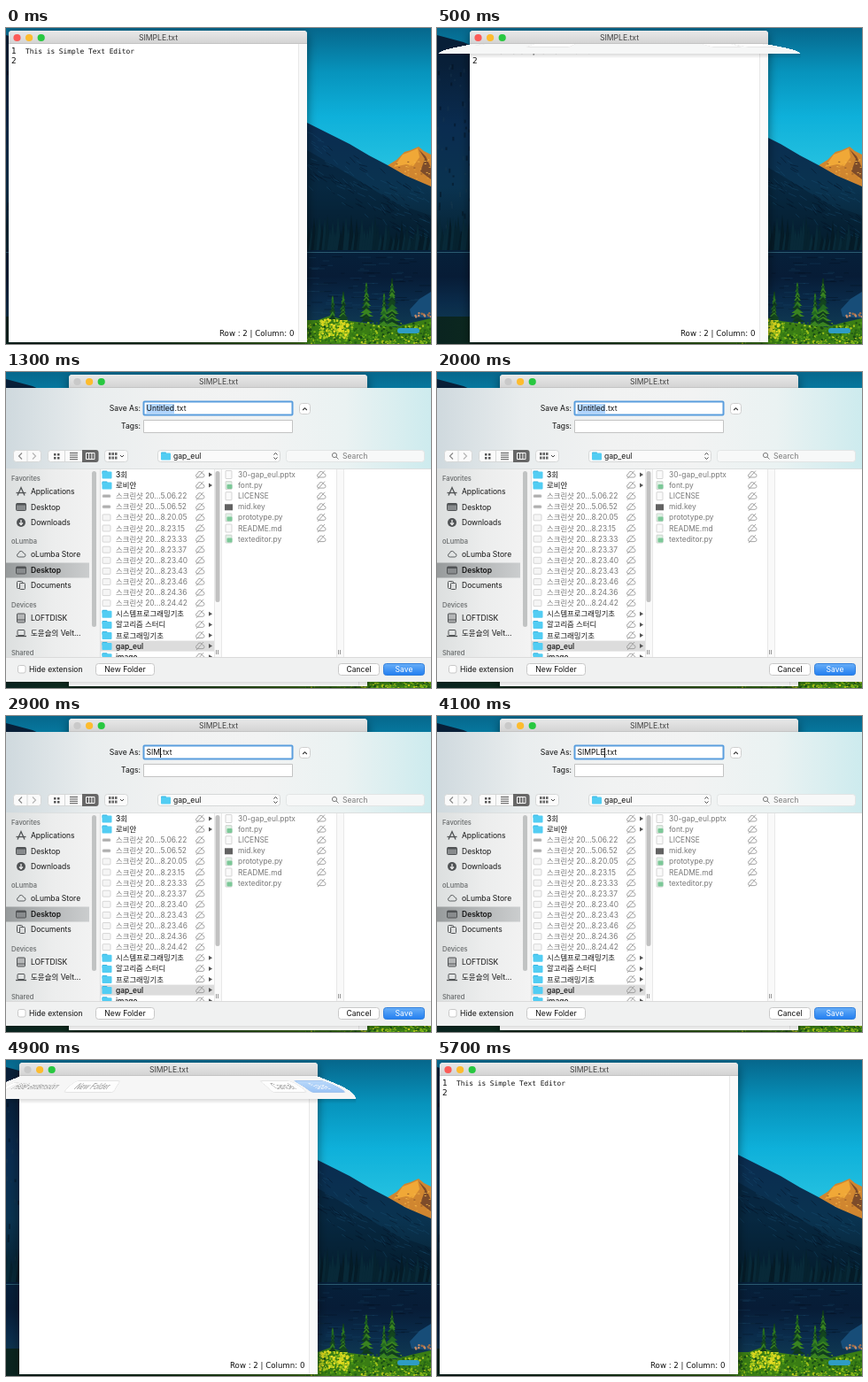
Animation of 480x357 px, one loop 5.8 s. Source, as an HTML page with a canvas:

```html
<!DOCTYPE html>
<html lang="en">
<head>
<meta charset="utf-8">
<title>Save sheet</title>
<style>
html, body { margin: 0; width: 100%; height: 100%; overflow: hidden; background: #06121f; }
canvas { display: block; }
</style>
</head>
<body>
<canvas id="stage" width="480" height="357"></canvas>
<script>
const W = 480, H = 357, TOP = 18, SHEET_H = 332, LOOP = 5800;
const UI = 'Inter, "Noto Sans CJK KR", "Noto Sans CJK", sans-serif';
const stage = document.getElementById('stage').getContext('2d');
const layer = () => Object.assign(document.createElement('canvas'), { width: W, height: H }).getContext('2d');
const wall = layer(), sheet = layer();
let g = stage;

const clamp = v => Math.max(0, Math.min(1, v));

function rect(x, y, w, h, fill) { g.fillStyle = fill; g.fillRect(x, y, w, h); }

function box(x, y, w, h, r, fill, stroke, line = 1) {
  g.beginPath();
  g.roundRect(x, y, w, h, r);
  if (fill) { g.fillStyle = fill; g.fill(); }
  if (stroke) { g.strokeStyle = stroke; g.lineWidth = line; g.stroke(); }
}

function poly(points, fill) {
  g.beginPath();
  for (let i = 0; i < points.length; i += 2) g.lineTo(points[i], points[i + 1]);
  g.fillStyle = fill;
  g.fill();
}

function line(points, color, width = 1) {
  g.beginPath();
  for (let i = 0; i < points.length; i += 2) g.lineTo(points[i], points[i + 1]);
  g.strokeStyle = color;
  g.lineWidth = width;
  g.stroke();
}

function dot(x, y, r, fill, stroke) {
  g.beginPath();
  g.arc(x, y, r, 0, 7);
  if (fill) { g.fillStyle = fill; g.fill(); }
  if (stroke) { g.strokeStyle = stroke; g.lineWidth = 1; g.stroke(); }
}

function text(s, x, y, color = '#111', size = 8.6, align = 'left', family = UI, weight = 400) {
  g.font = `${weight} ${size}px ${family}`;
  g.textAlign = align;
  g.textBaseline = 'alphabetic';
  g.fillStyle = color;
  g.fillText(s, x, y + size * 0.36);
}

function ramp(x0, y0, x1, y1, colors) {
  const f = g.createLinearGradient(x0, y0, x1, y1);
  colors.forEach((c, i) => f.addColorStop(i / (colors.length - 1), c));
  return f;
}
const fade = (y0, y1, ...colors) => ramp(0, y0, 0, y1, colors);
const across = (x0, x1, ...colors) => ramp(x0, 0, x1, 0, colors);

function paintWall() {
  g = wall;
  let seed = 7;
  const rnd = (a, b) => {
    seed = (seed * 16807) % 2147483647;
    return a + (b - a) * seed / 2147483647;
  };
  const pick = list => list[Math.floor(rnd(0, list.length))];

  rect(0, 0, W, H, fade(0, 150, '#06678c', '#0794bd', '#0eb0da', '#22bfdf'));
  // sunlit peak
  poly([428, 157, 441, 149, 450, 140, 457, 138, 466, 134, 472, 139, 480, 143, 480, 185, 440, 172], '#d08630');
  poly([448, 143, 456, 140, 465, 136, 467, 146, 460, 156, 452, 154, 438, 157], '#f0a837');
  poly([466, 137, 473, 148, 468, 162, 480, 171, 480, 158, 474, 145], '#7d4c2a');
  for (let i = 0; i < 35; i++) rect(rnd(440, 480), rnd(147, 172), 2, 1, pick(['#8a5529', '#f2b44b', '#e29b35']));
  // dark slopes
  poly([0, 8, 30, 16, 70, 34, 180, 90, 260, 170, 300, 80, 340, 107, 362, 118, 388, 131, 410, 144,
    431, 155, 452, 167, 480, 179, 480, 260, 0, 260], fade(40, 250, '#081f38', '#0a2c50', '#0a3350', '#06202f'));
  poly([340, 138, 385, 164, 440, 198, 480, 212, 480, 255, 340, 255], 'rgba(4,24,42,.4)');
  for (let i = 0; i < 150; i++) {
    const x = rnd(340, 475), y = rnd(4, 65) + 113 + (x - 340) * 0.5;
    line([x, y, x + rnd(4, 10), y + rnd(2, 7)], pick(['rgba(28,84,122,.35)', 'rgba(3,14,32,.4)']));
  }
  for (let i = 0; i < 120; i++) rect(rnd(0, 72), rnd(40, 250), 2, rnd(2, 6), pick(['rgba(30,60,80,.3)', 'rgba(2,10,20,.4)']));
  // far shore and lake
  for (let x = -3; x < W + 4; x += 3) {
    const y = rnd(207, 230) + (x > 420 ? 8 : 0);
    poly([x, y, x + 4, 254, x - 4, 254], pick(['#06222f', '#082938', '#051b27']));
  }
  rect(0, 251, W, 106, fade(251, 340, '#06203a', '#071c36', '#0a2b4a', '#103a52'));
  rect(0, 253, W, 1, '#2a5a70');
  for (let i = 0; i < 90; i++) rect(rnd(335, 470), rnd(258, 322), rnd(4, 16), 1, pick(['rgba(28,76,110,.3)', 'rgba(2,12,25,.35)']));
  poly([456, 318, 467, 306, 480, 298, 480, 328, 458, 326], '#174d78');
  // meadow
  rect(0, 326, 340, 31, across(0, 340, '#0a2420', '#12351c', '#3f7a14'));
  poly([330, 330, 352, 330, 366, 325, 382, 330, 410, 334, 440, 338, 458, 333, 480, 328, 480, 357, 330, 357], '#3a7d14');
  const leaves = ['#6fae16', '#a3c41a', '#235f14', '#4b9418', '#184a16', '#2f7517'];
  for (let i = 0; i < 420; i++) dot(rnd(338, 480), rnd(333, 358), rnd(0.6, 1.6), pick(leaves));
  for (let i = 0; i < 110; i++) dot(rnd(354, 388), rnd(329, 350), rnd(0.8, 1.8), pick(['#d6d51c', '#a9c91f', '#e6dc28']));
  for (let i = 0; i < 60; i++) rect(rnd(400, 480), rnd(348, 357), 2, 1, pick(['#d3d622', '#8fc01c']));
  for (let i = 0; i < 14; i++) dot(rnd(462, 480), rnd(321, 328), 1.2, pick(['#c48a68', '#9c6d4a']));
  box(442, 339, 25, 6, 3, '#2f9cc4');
  // conifers
  for (const [x, top, base, w] of [[436, 283, 336, 10], [407, 288, 332, 8], [381, 298, 330, 5], [369, 303, 328, 4], [427, 300, 336, 6]]) {
    line([x, top, x, base], '#123a1c');
    for (let y = top + 2; y < base; y += 2) {
      const r = w * (y - top) / (base - top) + 1;
      poly([x, y - 3, x + r * rnd(0.5, 1.1), y + 2, x - r * rnd(0.5, 1.1), y + 2], pick(['#14461f', '#236a22', '#103a1e', '#3a8420']));
    }
  }
}

function paintWindow(x, sheetOpen) {
  g.save();
  g.shadowColor = 'rgba(0,0,0,.5)';
  g.shadowBlur = 12;
  g.shadowOffsetY = 4;
  box(x, 3, 337, 352, [4, 4, 0, 0], '#fff');
  g.restore();
  box(x, 3, 337, 15, [4, 4, 0, 0], fade(3, 18, '#e9e9e9', '#d2d2d2'));
  rect(x, 17.5, 337, 0.5, '#b5b5b5');
  [sheetOpen ? '#c9c9c9' : '#fc5b57', '#fdbc2e', '#28c840'].forEach((c, i) => dot(x + 9.5 + i * 13.6, 11, 4.1, c));
  text('SIMPLE.txt', x + 169, 11, '#404040', 8.6, 'center');
  rect(x + 327, 18, 10, 337, '#fafafa');
  rect(x + 327, 18, 1, 337, '#e8e8e8');
  const lucid = '"DejaVu Sans", sans-serif';
  text('1', x + 3, 26, '#111', 9, 'left', lucid);
  text('2', x + 3, 36.5, '#111', 9, 'left', lucid);
  text('This is Simple Text Editor', x + 19, 26.5, '#111', 7.86, 'left', '"DejaVu Sans Mono", monospace');
  text('Row : 2 | Column: 0', x + 238, 345, '#111', 8.65, 'left', lucid);
}

function folder(x, y) {
  box(x, y - 4.5, 6, 4, 1, '#38b4e0');
  box(x, y - 3.5, 11, 8, 1, '#52cdf3');
}

function cloud(x, y, color = '#9a9a9a', slashed = true) {
  g.beginPath();
  g.arc(x - 2.5, y + 1, 2, 1.6, 4.6);
  g.arc(x, y - 1, 2.6, 3.3, 6);
  g.arc(x + 3, y + 1, 2, 4.8, 7.8);
  g.closePath();
  g.strokeStyle = color;
  g.lineWidth = 0.9;
  g.stroke();
  if (slashed) line([x - 4, y + 4.5, x + 4, y - 4.5], color, 0.9);
}

function sideIcon(kind, x, y) {
  const c = '#505355';
  if (kind === 'app') {
    line([x - 4, y + 4.5, x, y - 4.5, x + 4, y + 4.5], c, 1.3);
    line([x - 5.5, y + 1.5, x + 5.5, y + 1.5], c, 1.3);
  } else if (kind === 'desk') {
    box(x - 5.5, y - 4, 11, 8, 1, '#888b8d', c);
    rect(x - 5, y - 4, 10, 2, c);
  } else if (kind === 'down') {
    dot(x, y, 5, c);
    line([x, y - 3, x, y + 2.5], '#eee', 1.3);
    line([x - 2, y + 0.5, x, y + 2.5, x + 2, y + 0.5], '#eee', 1.3);
  } else if (kind === 'cloud') {
    cloud(x, y, c, false);
  } else if (kind === 'doc') {
    box(x - 4.5, y - 4.5, 6, 8, 1, null, c);
    box(x - 1.5, y - 2.5, 6, 7, 1, '#dcdede', c);
  } else if (kind === 'disk') {
    box(x - 4.5, y - 5, 9, 10, 1, '#b4b6b7', c);
    line([x - 4, y + 2, x + 4, y + 2], c);
  } else {
    box(x - 4, y - 3.5, 8, 6, 1, null, c);
    line([x - 6, y + 3.5, x + 6, y + 3.5], c, 1.3);
  }
}

const SIDEBAR = [
  ['Favorites', 120], ['Applications', 135, 'app'], ['Desktop', 152.5, 'desk'], ['Downloads', 170, 'down'],
  ['oLumba', 191], ['oLumba Store', 206, 'cloud'], ['Desktop', 224, 'desk'], ['Documents', 241, 'doc'],
  ['Devices', 263], ['LOFTDISK', 278, 'disk'], ['도윤슬의 Velt...', 295, 'laptop'], ['Shared', 317]
];
const SHOTS = '5.06.22 5.06.52 8.20.05 8.23.15 8.23.33 8.23.37 8.23.40 8.23.43 8.23.46 8.24.36 8.24.42'.split(' ');
const FOLDERS = ['3회', '로비안', ...SHOTS.map(s => '스크린샷 20...' + s),
  '시스템프로그래밍기초', '알고리즘 스터디', '프로그래밍기초', 'gap_eul', 'image'];
const FILES = ['30-gap_eul.pptx', 'font.py', 'LICENSE', 'mid.key', 'prototype.py', 'README.md', 'texteditor.py'];

function paintLists() {
  g.save();
  g.beginPath();
  g.rect(0, 110, W, 212);
  g.clip();
  rect(0, 110, 106, 212, across(0, 106, '#dcdfdf', '#eceded', '#f3f3f3'));
  rect(0, 215.5, 94, 17, across(0, 94, '#979b9c', '#b4b7b8', '#cbcdce'));
  box(97, 112, 5, 176, 2.5, '#c1c3c3');
  for (const [name, y, icon] of SIDEBAR) {
    if (icon) {
      sideIcon(icon, 17, y);
      text(name, 28, y, '#151515', 8.5, 'left', UI, y === 224 ? 600 : 400);
    } else text(name, 6, y, '#66696a', 7.5, 'left', UI, 500);
  }
  FOLDERS.forEach((name, i) => {
    const y = 116 + i * 12.1, shot = name.startsWith('스크린샷');
    if (name === 'gap_eul') rect(107, y - 6, 128, 12, '#dcdcdc');
    if (shot) {
      box(109, y - (i < 4 ? 1.5 : 3.5), 9, i < 4 ? 3 : 7, 1, i < 4 ? '#aaa' : '#f5f5f5', '#cdcdcd', 0.8);
    } else {
      folder(108.5, y);
      poly([229, y - 2.5, 233, y, 229, y + 2.5], '#555');
    }
    text(name, 124, y, shot ? '#777' : '#111', 8.4, 'left', UI, shot ? 400 : 500);
    cloud(219, y);
  });
  FILES.forEach((name, i) => {
    const y = 116 + i * 12.1, py = name.endsWith('.py');
    if (name === 'mid.key') rect(247, y - 3, 9, 7, '#626262');
    else box(248, y - 4.5, 7, 9, 0.5, py ? '#dff1e4' : '#fafafa', '#c4c4c4', 0.7);
    if (py) box(249.5, y - 1, 6, 5, 1, '#7cc898');
    text(name, 262, y, '#777', 8.4);
    cloud(356, y);
  });
  box(236.5, 112, 5, 148, 2.5, '#c1c1c1');
  g.restore();
}

function button(x, w, label, blue) {
  box(x + 0.5, 329.5, w, 13, 3, blue ? fade(329, 343, '#6cb1f8', '#1f7cf0') : '#fff', blue ? '#3380dc' : '#c8c8c8');
  text(label, x + w / 2 + 0.5, 336, blue ? '#fff' : '#111', 8.6, 'center');
}

function paintSheet(typed, active) {
  g = sheet;
  g.clearRect(0, 0, W, H);
  rect(0, TOP, W, SHEET_H, '#f0f1f1');
  rect(0, TOP, W, 92, across(0, W, '#cfd9de', '#e9edee', '#f1f2f2', '#f2f3f3', '#eaf2f2', '#cdebee'));

  text('Save As:', 152, 41, '#111', 8.6, 'right');
  text('Tags:', 152, 61, '#111', 8.6, 'right');
  if (active) box(155.5, 33.5, 168, 15, 1, '#fff', '#5a9ede', 2);
  else box(155.5, 33.5, 168, 15, 0, '#fff', '#c3c3c3');
  box(155.5, 54.5, 168, 14, 0, '#fff', '#c3c3c3');
  g.font = `8.6px ${UI}`;
  const name = typed || 'Untitled', end = 158.5 + g.measureText(name).width;
  if (!typed) rect(158.5, 36, end - 158.5, 11, active ? '#b2d6fd' : '#d2d2d2');
  text(name, 158.5, 41);
  text('.txt', end + 0.5, 41);
  if (typed) rect(Math.round(end - 0.5), 36, 1, 11, '#111');
  box(331.5, 35.5, 12, 12, 3, '#fff', '#cfcfcf');
  line([335.2, 43, 337.5, 40.7, 339.8, 43], '#333', 1.1);

  const edge = '#d6d8d8', face = '#fafafa';
  box(8.5, 88.5, 31, 13, 3, face, edge);
  line([24, 89, 24, 101], edge);
  line([18, 91.5, 14.5, 95, 18, 98.5], active ? '#8a8a8a' : '#333', 1.2);
  line([30, 91.5, 33.5, 95, 30, 98.5], '#b5b5b5', 1.2);
  box(47.5, 88.5, 57, 13, 3, face, edge);
  line([66.5, 89, 66.5, 101], edge);
  box(86, 88, 18.5, 14, [0, 3, 3, 0], '#676767');
  for (const x of [54, 58]) for (const y of [92, 96]) rect(x, y, 2.5, 2.5, '#555');
  for (let i = 0; i < 4; i++) rect(72, 91 + i * 2.4, 9, 1, '#555');
  box(90.5, 91.5, 9.5, 7, 0, null, '#fff');
  line([93.7, 91, 93.7, 99], '#fff');
  line([96.9, 91, 96.9, 99], '#fff');
  box(111.5, 88.5, 26, 13, 3, face, edge);
  for (const x of [116, 119.5, 123]) for (const y of [91, 95.5]) rect(x, y, 2.5, 3, '#666');
  line([129, 94, 131, 96, 133, 94], '#444');
  box(171.5, 88.5, 138, 13, 3, face, edge);
  folder(175, 95);
  text('gap_eul', 189, 95);
  line([302.5, 93.5, 304.5, 91.5, 306.5, 93.5], '#444');
  line([302.5, 96.5, 304.5, 98.5, 306.5, 96.5], '#444');
  box(316.5, 88.5, 156, 13, 3, '#f7f8f8', '#e2e5e5');
  const faint = active ? '#7c7c7c' : '#bcbcbc';
  dot(371, 94, 2.6, null, faint);
  line([373, 96, 375.5, 98.5], faint);
  text('Search', 380, 95, faint);

  rect(0, 109, W, 1, '#dcdfdf');
  rect(0, 110, 106, 212, '#eff0f1');
  rect(106, 110, 374, 212, '#fff');
  rect(106, 110, 1, 212, '#dedede');
  for (const x of [235, 373]) {
    rect(x, 110, 9, 212, '#f9f9f9');
    rect(x, 110, 1, 212, '#e8e8e8');
    rect(x + 8, 110, 1, 212, '#e8e8e8');
    rect(x + 2, 314, 1, 5, '#999');
    rect(x + 4, 314, 1, 5, '#999');
  }
  if (active) paintLists();
  rect(0, 322, W, 1, '#dadada');
  box(13.5, 331.5, 8.5, 8.5, 2, '#fff', '#c8c8c8');
  text('Hide extension', 26, 336);
  button(101, 66, 'New Folder');
  button(375, 46, 'Cancel');
  button(426, 46, 'Save', active);
}

// The sheet slides out below the title bar, wider towards its lower edge and pale while short.
function placeSheet(open, center) {
  const drop = clamp(open / 0.75), height = Math.round(SHEET_H * drop);
  const narrow = 0.7 + 0.3 * clamp((open - 0.7) / 0.3);
  const wide = Math.max(narrow, 0.7 + 0.3 * drop ** 0.2);
  const span = y => W * (narrow + (wide - narrow) * Math.sin(Math.PI / 2 * Math.min(1, y / height)));
  const haze = `rgba(252,252,252,${0.6 * (1 - drop)})`;
  g = stage;
  for (let y = 0; y < height + 5; y++) {
    const w = span(y), x = center - w / 2;
    if (y < height) {
      g.drawImage(sheet.canvas, 0, TOP + y + SHEET_H - height, W, 1, x, TOP + y, w, 1);
      rect(x, TOP + y, w, 1, haze);
    } else rect(x, TOP + y, w, 1, `rgba(0,0,0,${0.025 * (height + 5 - y)})`);
  }
}

const KEYS = [2300, 2500, 2800, 3100, 3400, 3700];

function draw(t) {
  const shift = Math.round(68 * (t < 2500 ? clamp((t - 300) / 400) : clamp((4985 - t) / 480)));
  const open = t < 2500 ? clamp((t - 490) / 400) : clamp((4928 - t) / 480);
  const active = t >= 1000;
  g = stage;
  g.drawImage(wall.canvas, 0, 0);
  paintWindow(3 + shift, active && t < 5100);
  if (open > 0) {
    paintSheet('SIMPLE'.slice(0, KEYS.filter(k => t >= k).length), active);
    placeSheet(open, 172 + shift);
  }
}

paintWall();
const start = performance.now();
function tick() {
  const t = (performance.now() - start) % LOOP;
  draw(Math.floor(t / 100) * 100);
  requestAnimationFrame(tick);
}
tick();
</script>
</body>
</html>
```
